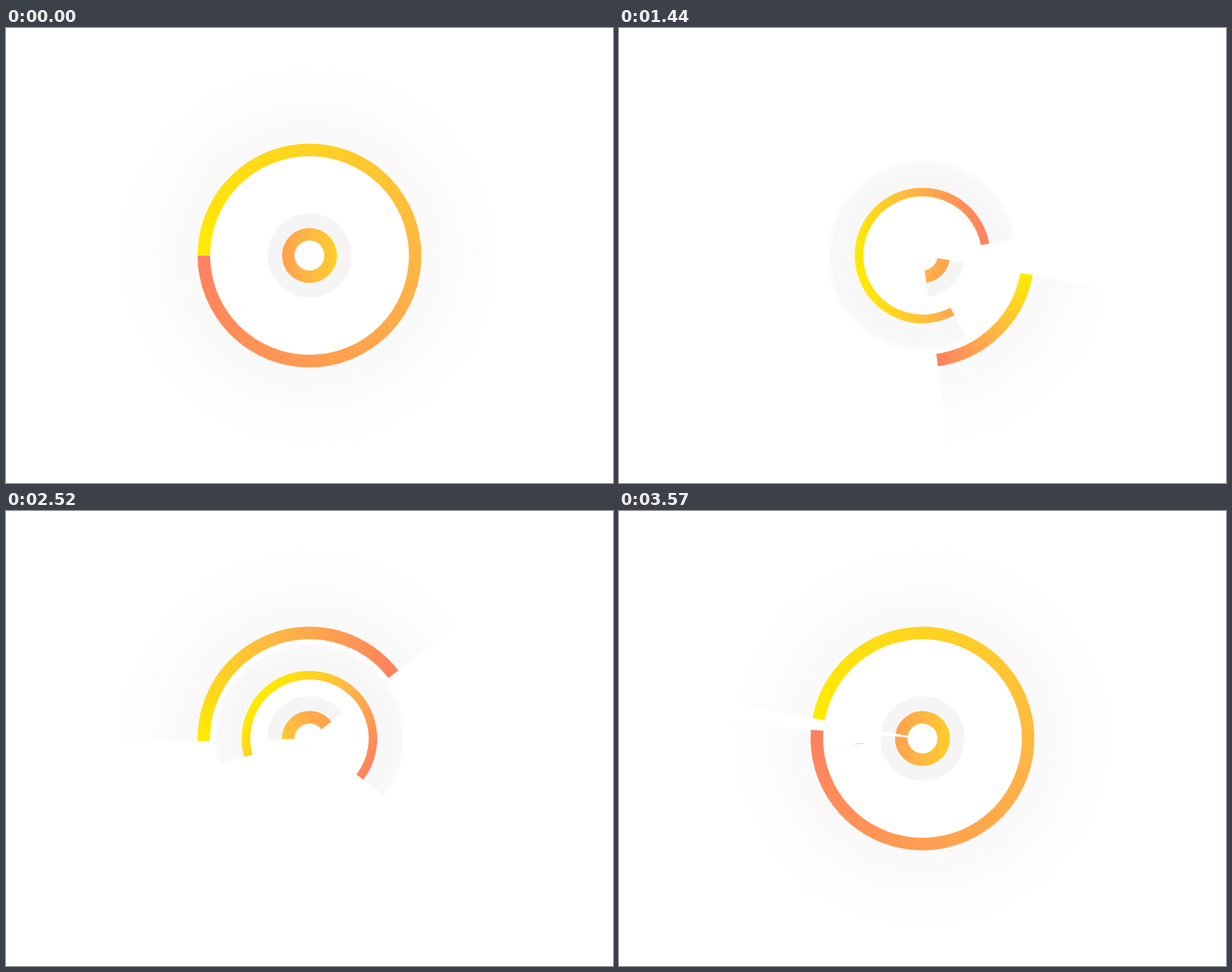
These frames come from a looping animation (800 by 600 pixels, 3600 ms). An HTML page with a canvas:

```html
<!DOCTYPE html>
<html lang="en">
<head>
<meta charset="utf-8">
<title>Ring loader</title>
<style>
  html, body { margin: 0; height: 100%; overflow: hidden; background: #fff; }
  canvas { display: block; }
</style>
</head>
<body>
<canvas id="stage" width="800" height="600"></canvas>
<script>
const ctx = document.getElementById('stage').getContext('2d');
const LOOP = 3600, STEP = 30, HALF = LOOP / 2;
const CX = 400, CY = 300, RAD = Math.PI / 180;
const STOPS = [[0, '#ffec00'], [0.5, '#ffb744'], [1, '#ff8060']];

const smooth = x => x * x * (3 - 2 * x);
const settle = x => x * x * (1.5 - 0.5 * x);

// Angles are in degrees, clockwise from east.
function band(inner, outer, start, span, paint) {
  if (span <= 0) return;
  ctx.beginPath();
  ctx.arc(CX, CY, (inner + outer) / 2, start * RAD, (start + span) * RAD);
  ctx.lineWidth = outer - inner;
  ctx.strokeStyle = paint;
  ctx.stroke();
}

// Yellow to red across the disc, red pointing towards the angle.
function axisGradient(angle, radius) {
  const dx = Math.cos(angle * RAD) * radius, dy = Math.sin(angle * RAD) * radius;
  const g = ctx.createLinearGradient(CX - dx, CY - dy, CX + dx, CY + dy);
  STOPS.forEach(([at, color]) => g.addColorStop(at, color));
  return g;
}

// Yellow to red along an arc; the unused part is split between both ends.
function arcGradient(start, span) {
  const g = ctx.createConicGradient(start * RAD, CX, CY);
  const part = Math.min(1, span / 360);
  STOPS.forEach(([at, color]) => g.addColorStop(at * part, color));
  if (part < 1) {
    g.addColorStop((1 + part) / 2, STOPS[2][1]);
    g.addColorStop((1 + part) / 2, STOPS[0][1]);
  }
  return g;
}

function fade(...stops) {
  const [from, to] = [stops[0][0], stops[stops.length - 1][0]];
  const g = ctx.createRadialGradient(CX, CY, from, CX, CY, to);
  stops.forEach(([r, color]) => g.addColorStop((r - from) / (to - from), color));
  return g;
}

const outerGlow = fade([147, '#f9f9f9'], [200, '#fcfcfc'], [265, '#ffffff']);
const middleGlow = fade([89, '#f7f7f7'], [120, '#f8f8f8'], [127, '#ffffff']);

function draw(time) {
  const t = Math.floor((time % LOOP) / STEP) * STEP;
  const opening = t >= HALF;
  const x = Math.abs(1 - t / HALF);
  const angle = (opening ? -180 : 180) * settle(x);

  const span = 360 * x;
  const start = opening ? angle - span : angle;
  const midSpan = 360 * (opening ? 1 - smooth(x) : 1 - x);
  const midStart = -angle - midSpan;

  ctx.fillStyle = '#fff';
  ctx.fillRect(0, 0, 800, 600);

  band(147, 265, start, span, outerGlow);
  band(89, 127, midStart, midSpan, middleGlow);
  band(36, 55.5, start, span, '#f5f5f5');

  band(131, 147.5, start, span, arcGradient(start, span));
  band(78, 89.3, midStart, midSpan, axisGradient(-angle, 89));
  band(19.7, 36.2, start, span, axisGradient(angle, 89));
}

function tick(now) {
  draw(now);
  requestAnimationFrame(tick);
}
draw(0);
requestAnimationFrame(tick);
</script>
</body>
</html>
```
